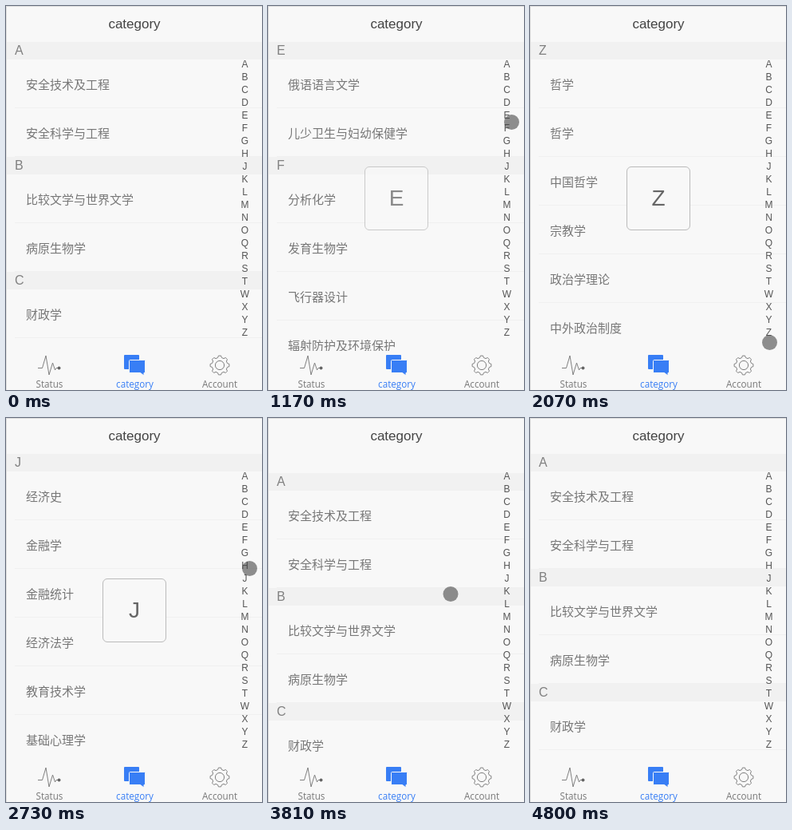
These frames come from a looping animation (321 px wide and 481 px high, 4890 ms). An HTML page:

```html
<!DOCTYPE html>
<html lang="zh-CN">
<head>
<meta charset="utf-8">
<title>category</title>
<style>
html, body { margin: 0; width: 100%; height: 100%; overflow: hidden; background: #f8f8f8; }
body { position: relative; font-family: Arial, "Liberation Sans", sans-serif; }
#stage { position: absolute; left: 0; top: 0; width: 321px; height: 481px; overflow: hidden; background: #f8f8f8; }
#stage > * { position: absolute; }
#title { left: 1px; top: 0; width: 320px; font-size: 17px; line-height: 46px; text-align: center; color: #444; }
#view { left: 1px; top: 45px; width: 320px; height: 387px; overflow: hidden; }
#list { position: absolute; left: 0; top: 0; width: 320px; }
.head { height: 22px; padding-left: 10px; font-size: 16px; line-height: 22px; color: #808080; background: #f1f1f1; }
.item { height: 60px; margin-left: 10px; padding-left: 14px; border-bottom: 1px solid #f0f0f0;
  font: 15px/62px "Noto Sans CJK SC", "Noto Sans CJK", sans-serif; color: #777; white-space: nowrap; }
#index { left: 289px; top: 65px; width: 21px; font-size: 12px; line-height: 16px; text-align: center; color: #555; }
#popup { left: 121px; top: 201px; width: 78px; height: 78px; border: 1px solid #bbb; border-radius: 6px;
  background: #f8f8f8; font-size: 28px; line-height: 78px; text-align: center; color: #666; }
#dot { left: -9.5px; top: -9.5px; width: 19px; height: 19px; border-radius: 50%; background: rgba(70, 70, 70, .6); }
#tabs { left: 0; top: 432px; }
#tabs text { font: 11.7px "Open Sans", "Noto Sans", sans-serif; text-anchor: middle; fill: #777; }
#edge { left: 0; top: 0; width: 320px; height: 480px; border: solid #ddd; border-width: 1px 0 0 1px; }
</style>
</head>
<body>
<div id="stage">
  <div id="title">category</div>
  <div id="view"><div id="list"></div></div>
  <div id="index"></div>
  <svg id="tabs" width="321" height="49" viewBox="0 432 321 49">
    <rect y="432" width="321" height="49" fill="#f8f8f8"/>
    <g fill="none" stroke="#808080" stroke-linejoin="round">
      <path d="M40 453.5H45.5L50 438L54 462L58.5 447L61.5 456L63 453.5H66"/>
      <path id="gear"/>
      <circle cx="268" cy="450" r="5.6"/>
    </g>
    <circle cx="66.5" cy="453.5" r="2" fill="#666"/>
    <g fill="#387ef5">
      <path d="M149 437H166Q167 437 167 438V455H149Q148 455 148 454V438Q148 437 149 437Z"/>
      <path d="M155.500 443.500H173.500Q174.500 443.500 174.500 444.500V459.500H173V463L168.500 459.500H154.500V444.500Q154.500 443.500 155.500 443.500Z" stroke="#f8f8f8"/>
    </g>
    <text x="54.500" y="478">Status</text>
    <text x="161.500" y="478" style="fill:#387ef5">category</text>
    <text x="268" y="478">Account</text>
  </svg>
  <div id="popup"></div>
  <div id="dot"></div>
  <div id="edge"></div>
</div>
<script>
const LOOP = 4890, STEP = 30, FADE = 80;
const PRESS = 1110, RELEASE = 3360, PULL = 3600, LET_GO = 4000, REST = 4800;

const sections = [
  'A 安全技术及工程 安全科学与工程',
  'B 比较文学与世界文学 病原生物学',
  'C 财政学 材料学 测试计量技术及仪器',
  'D 地图学与地理信息系统 大气物理学 电路与系统',
  'E 俄语语言文学 儿少卫生与妇幼保健学',
  'F 分析化学 发育生物学 飞行器设计 辐射防护及环境保护',
  'G 国际关系 国民经济学 高分子化学与物理 固体力学',
  'H 环境科学 海洋化学 会计学 核技术及应用',
  'J 经济史 金融学 金融统计 经济法学 教育技术学 基础心理学',
  'K 考古学及博物馆学 科学技术史 空间物理学 控制理论',
  'L 伦理学 逻辑学 理论物理 旅游管理 流体力学',
  'M 美学 民俗学 美术学 免疫学 密码学',
  'N 农业经济管理 农药学 凝聚态物理 内科学',
  'O 欧洲语言文学',
  'Q 区域经济学 企业管理 情报学 气象学',
  'R 人口学 人类学 热能工程 软件工程',
  'S 世界经济 社会学 数量经济学 生态学 思想政治教育',
  'T 统计学 体育人文社会学 天体物理 土壤学',
  'W 外国哲学 文艺学 无机化学 微生物学 舞蹈学',
  'X 西方经济学 宪法学 刑法学 新闻学 心理学',
  'Y 语言学 英语语言文学 应用数学 遗传学 音乐学',
  'Z 哲学 哲学 中国哲学 宗教学 政治学理论 中外政治制度 政治经济学'
].map(s => s.split(' '));

// pointer path: time, x, y
const path = [
  [60, 297, 49], [240, 264, 60], [390, 255, 97], [540, 292, 75],
  [840, 164, 241], [1080, 305, 141], [1140, 305, 141], [1170, 305, 145],
  [1650, 308, 300], [2070, 300, 421], [2400, 300, 421], [2580, 303, 285],
  [2730, 305, 188], [3060, 304, 90], [3210, 302, 66], [3240, 302, 64],
  [3360, 302, 64], [3600, 235, 150], [4020, 222, 290]
];

const $ = id => document.getElementById(id);
const list = $('list'), popup = $('popup'), dot = $('dot');

function add(parent, cls, text) {
  const el = document.createElement('div');
  el.className = cls;
  el.textContent = text;
  parent.append(el);
}

const tops = [];
let height = 0;
for (const [letter, ...names] of sections) {
  tops.push(height);
  height += 22 + 61 * names.length;
  add(list, 'head', letter);
  names.forEach(name => add(list, 'item', name));
  add($('index'), '', letter);
}

function gearPath(cx, cy, teeth) {
  const pts = [];
  for (let i = 0; i < teeth; i++) {
    for (const [a, r] of [[-.32, 9.8], [-.17, 12], [.17, 12], [.32, 9.8]]) {
      const q = (i + a) * 2 * Math.PI / teeth;
      pts.push((cx + r * Math.sin(q)).toFixed(1) + ' ' + (cy - r * Math.cos(q)).toFixed(1));
    }
  }
  return 'M' + pts.join('L') + 'Z';
}
$('gear').setAttribute('d', gearPath(268, 450, 8));

function pointer(t) {
  const i = Math.max(1, path.findIndex(p => p[0] >= t));
  const [t0, x0, y0] = path[i - 1], [t1, x1, y1] = path[i];
  const k = (t - t0) / (t1 - t0);
  return [x0 + (x1 - x0) * k, y0 + (y1 - y0) * k];
}

// the chosen letter trails the finger by one step
function letterAt(t) {
  const y = pointer(t - STEP)[1];
  return Math.min(sections.length - 1, Math.max(0, Math.floor((y - 65) / 16)));
}

const bounce = t => 30 * Math.pow((REST - t) / 660, 2.28);

function overscroll(t) {
  if (t < PULL || t >= REST) return 0;
  return t < LET_GO ? bounce(LET_GO) * (t - PULL) / (LET_GO - PULL) : bounce(t);
}

function draw(time) {
  const t = Math.floor(time % LOOP / STEP) * STEP;
  const active = t > PRESS && t < RELEASE + FADE;
  const n = active ? letterAt(Math.min(t, RELEASE)) : 0;
  list.style.transform = `translateY(${Math.round(overscroll(t) - tops[n])}px)`;
  popup.style.opacity = Math.max(0, Math.min(1, (t - PRESS) / FADE, (RELEASE + FADE - t) / FADE));
  popup.textContent = sections[n][0];
  const shown = t >= 60 && t < 4020;
  dot.style.display = shown ? '' : 'none';
  if (shown) {
    const [x, y] = pointer(t);
    dot.style.transform = `translate(${x}px, ${y}px)`;
  }
}

const start = performance.now();
function tick() {
  draw(performance.now() - start);
  requestAnimationFrame(tick);
}
tick();
</script>
</body>
</html>
```
